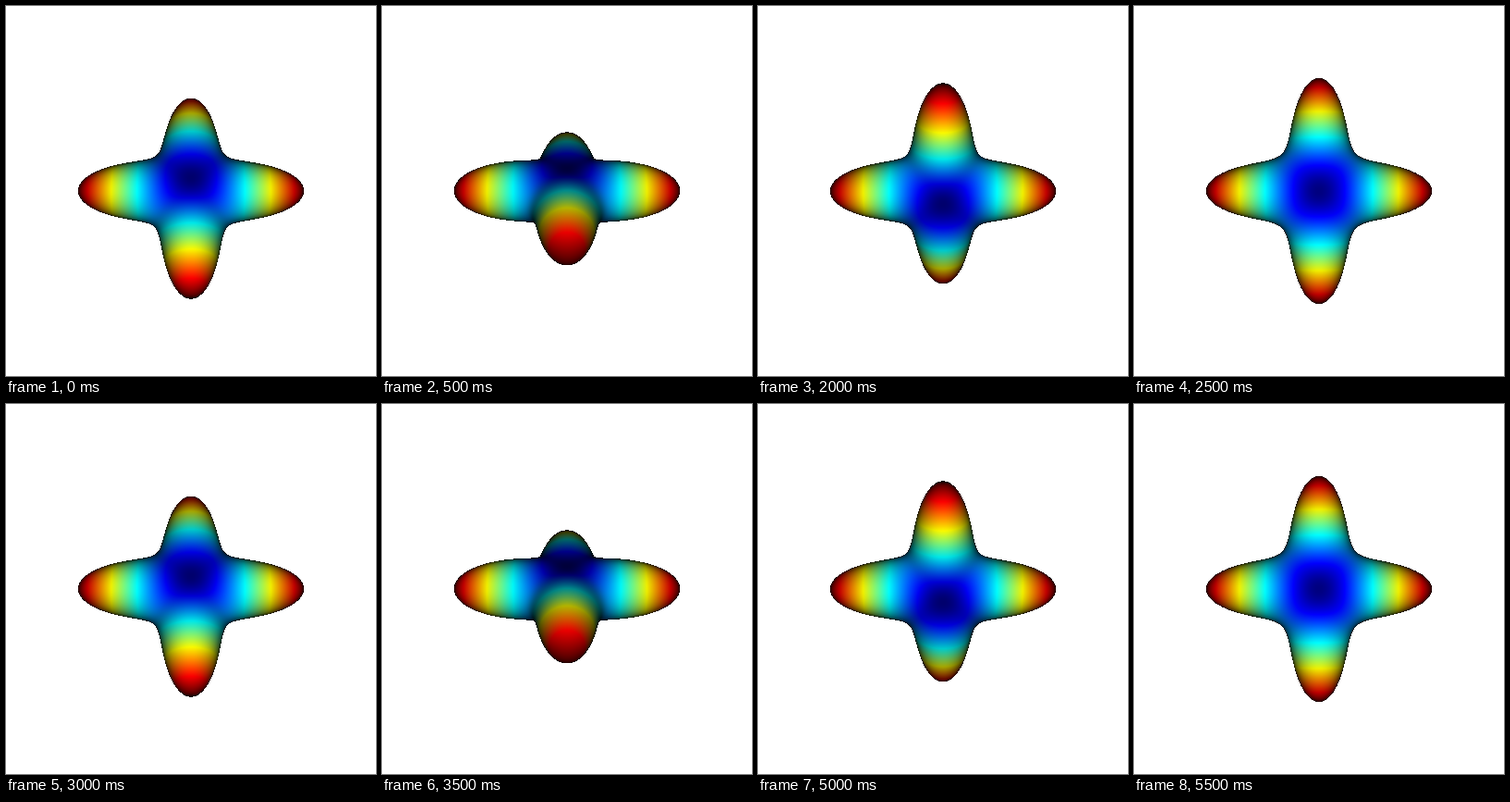
These frames come from a looping animation (400 px wide and 400 px high, 6000 ms). An HTML page with a canvas:

```html
<!DOCTYPE html>
<html>
<head>
<meta charset="utf-8">
<style>
html, body { margin: 0; width: 100%; height: 100%; overflow: hidden; background: #fff; }
canvas { display: block; width: 400px; height: 400px; }
</style>
</head>
<body>
<canvas id="c" width="400" height="400"></canvas>
<script>
const ctx = document.getElementById('c').getContext('2d');
const SIZE = 400, MID = 200, CAMERA = 709, STEP = 2;
const TIP = 122, WAIST = 30;
const poses = [];

// Four-lobed radial surface, 1/r quartic in direction: negative inside, positive outside
function field(x, y, z) {
  const X = x * x, Y = y * y, Z = z * z, s = X + Y + Z + 1e-9;
  const q = (X * X + Y * Y) / TIP + Z * Z / WAIST + 0.054 * X * Y + 0.046 * Z * (X + Y);
  return Math.sqrt(s) * q / (s * s) - 1;
}

const clamp = v => Math.max(0, Math.min(1, v));
const jet = v => [3, 2, 1].map(k => clamp(1.5 - Math.abs(4 * v - k)));

function render(angle) {
  const img = ctx.createImageData(SIZE, SIZE);
  img.data.fill(255);
  const c = Math.cos(angle), s = Math.sin(angle);
  const at = (x, y, z) => field(x, y * c - z * s, y * s + z * c);

  for (let j = 76; j < 324; j++) for (let i = 76; i < 324; i++) {
    const px = i + 0.5 - MID, py = MID - j - 0.5;
    const value = z => at(px * (1 - z / CAMERA), py * (1 - z / CAMERA), z);
    const reach = Math.sqrt(Math.max(0, 126 * 126 - (px * px + py * py) * 0.95));
    let z = reach;
    while (z > -reach && value(z) > 0) z -= STEP;
    if (z <= -reach) continue;

    let lo = z, hi = z + STEP;
    for (let n = 0; n < 9; n++) {
      const m = (lo + hi) / 2;
      if (value(m) > 0) hi = m; else lo = m;
    }
    const x = px * (1 - lo / CAMERA), y = py * (1 - lo / CAMERA), e = 0.05;
    const nx = at(x + e, y, lo) - at(x - e, y, lo);
    const ny = at(x, y + e, lo) - at(x, y - e, lo);
    const nz = at(x, y, lo + e) - at(x, y, lo - e);
    const toEye = CAMERA - lo;
    const light = clamp((nz * toEye - nx * x - ny * y) / Math.hypot(nx, ny, nz) / Math.hypot(x, y, toEye));
    const rgb = jet(clamp((Math.hypot(x, y, lo) - WAIST) / (TIP - WAIST)));
    rgb.forEach((v, k) => img.data[(j * SIZE + i) * 4 + k] = 255 * v * light);
  }
  return img;
}

let shown = -1;
function draw(now) {
  // Turns 30 degrees every half second; looks the same after half a turn
  const pose = Math.floor(now % 6000 / 500) % 6;
  if (pose !== shown) {
    poses[pose] = poses[pose] || render((pose + 1) * Math.PI / 6);
    ctx.putImageData(poses[pose], 0, 0);
    shown = pose;
  }
  requestAnimationFrame(() => draw(performance.now() - start));
}
const start = performance.now();
draw(0);
</script>
</body>
</html>
```
